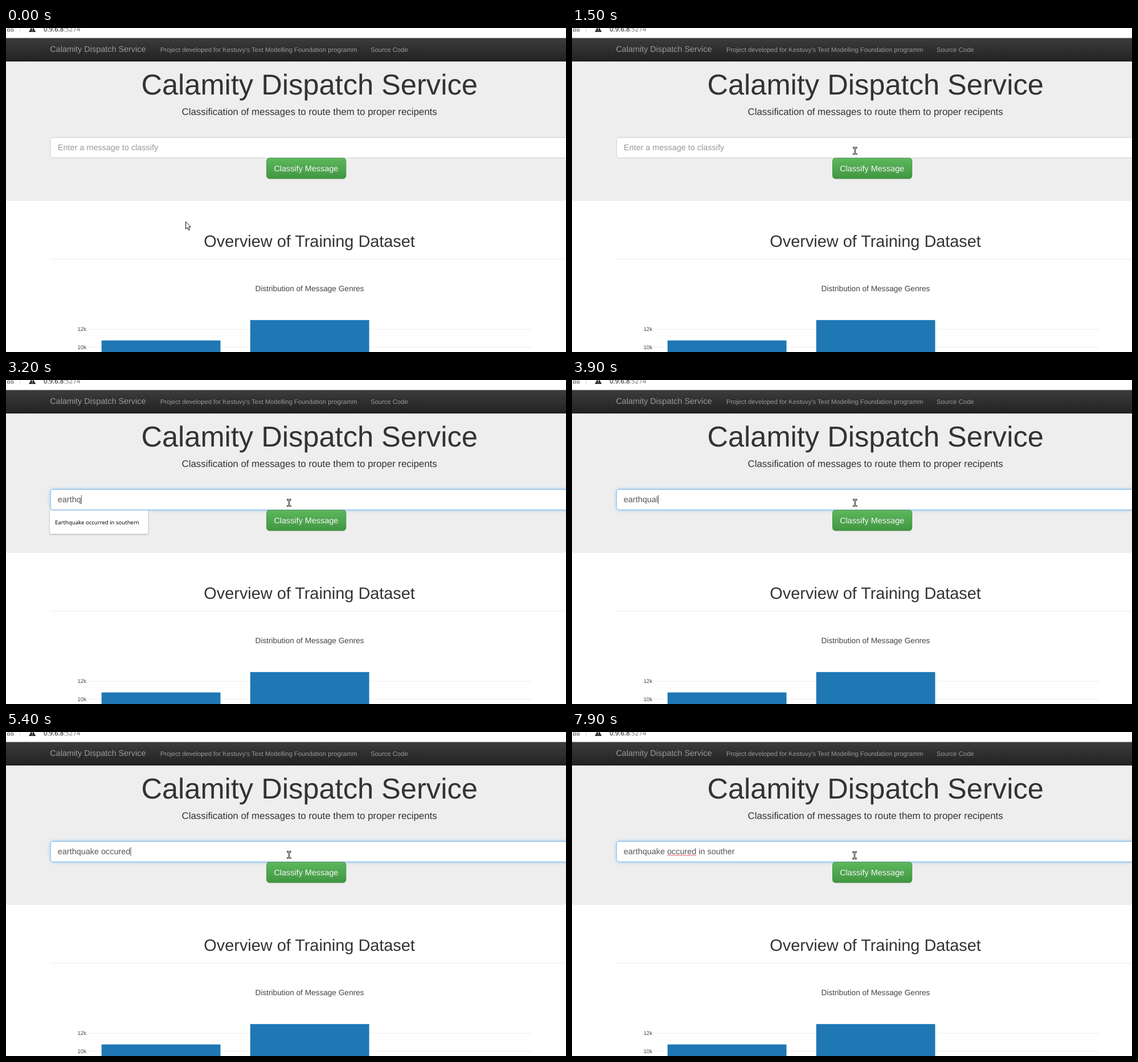
Recreate the animation shown at these times as an HTML page with a canvas. Size 983x570 px, loop 8 s.

```html
<!DOCTYPE html>
<html lang="en">
<head>
<meta charset="utf-8">
<title>Message classifier</title>
<style>
  html, body { margin: 0; width: 100%; height: 100%; overflow: hidden; background: #fff; }
  canvas { display: block; }
</style>
</head>
<body>
<canvas id="stage" width="983" height="570"></canvas>
<script>
const ctx = document.getElementById('stage').getContext('2d');
const W = 983, H = 570, LOOP = 8000, MID = 532.6;
const SANS = '"Liberation Sans", Arial, sans-serif';
const UI = '"Noto Sans", "Open Sans", sans-serif';
const TITLE = 'Calamity Dispatch Service';
const NAV = { top: 17.6, bottom: 58.6 };
const FIELD = { x: 78.2, y: 192.4, w: 930, h: 36.1, textX: 90.8, base: 215.2, size: 14.43 };

// [time, text in the field]
const TYPING = [
  [0, ''], [2300, 'ea'], [3200, 'earthq'], [3300, 'earthqu'], [3400, 'earthqua'],
  [3600, 'earthqual'], [3700, 'earthquale'], [3900, 'earthqual'], [4100, 'earthqua'],
  [4300, 'earthquak'], [4400, 'earthquake'], [4500, 'earthquake o'], [4600, 'earthquake oc'],
  [4800, 'earthquake occ'], [4900, 'earthquake occu'], [5100, 'earthquake occur'],
  [5200, 'earthquake occure'], [5400, 'earthquake occured'], [5500, 'earthquake occured i'],
  [5900, 'earthquake occured in s'], [6000, 'earthquake occured in so'],
  [6200, 'earthquake occured in sou'], [6300, 'earthquake occured in sout'],
  [6500, 'earthquake occured in soute'], [6700, 'earthquake occured in sout'],
  [7000, 'earthquake occured in south'], [7100, 'earthquake occured in souther'],
  [7300, 'earthquake occured in souther '], [7400, 'earthquake occured in souther n'],
  [7600, 'earthquake occured in souther '], [7800, 'earthquake occured in souther']
];

const clamp = v => Math.max(0, Math.min(1, v));
const mix = (a, b, k) => a + (b - a) * k;
const within = (t, a, b) => t >= a && t < b;

function rect(x, y, w, h, color) {
  ctx.fillStyle = color;
  ctx.fillRect(x, y, w, h);
}

function text(str, x, y, size, color, align = 'left', family = SANS) {
  ctx.font = `${size}px ${family}`;
  ctx.textAlign = align;
  ctx.fillStyle = color;
  ctx.fillText(str, x, y);
}

function embossed(str, x, y, size, color, alpha, align) {
  text(str, x, y - 0.8, size, `rgba(0,0,0,${alpha})`, align);
  text(str, x, y, size, color, align);
}

function box(x, y, w, h, r, fill, stroke) {
  ctx.beginPath();
  ctx.roundRect(x, y, w, h, r);
  ctx.fillStyle = fill;
  ctx.fill();
  if (!stroke) return;
  ctx.strokeStyle = stroke;
  ctx.lineWidth = 0.9;
  ctx.stroke();
}

function shadowed(color, blur, dy, draw) {
  ctx.save();
  ctx.shadowColor = color;
  ctx.shadowBlur = blur;
  ctx.shadowOffsetY = dy;
  draw();
  ctx.restore();
}

function gradient(y0, y1, top, bottom) {
  const g = ctx.createLinearGradient(0, y0, 0, y1);
  g.addColorStop(0, top);
  g.addColorStop(1, bottom);
  return g;
}

function polygon(points, fill, stroke) {
  ctx.beginPath();
  points.forEach(([x, y]) => ctx.lineTo(x, y));
  ctx.closePath();
  ctx.fillStyle = fill;
  ctx.fill();
  if (!stroke) return;
  ctx.strokeStyle = stroke;
  ctx.lineWidth = 1;
  ctx.stroke();
}

function addressBar() {
  ctx.strokeStyle = '#5b5b60';
  ctx.lineWidth = 1;
  for (const x of [2.5, 8.9]) {
    ctx.strokeRect(x, 1.8, 3.8, 3.8);
    ctx.strokeRect(x, -4.3, 3.8, 3.8);
  }
  rect(24.6, 0, 0.9, 7.5, '#cfcfd4');
  polygon([[46, -4], [52.3, 7], [40, 7]], '#2b2a33');
  rect(45.5, 0, 1.3, 2.8, '#fff');
  rect(45.5, 4, 1.3, 1.3, '#fff');
  const host = '0.9.6.8';
  text(host, 66, 6.2, 11.4, '#15141a', 'left', UI);
  text(':5274', 66 + ctx.measureText(host).width, 6.2, 11.4, '#77777d', 'left', UI);
}

function navbar() {
  const { top, bottom } = NAV;
  rect(0, top, W, bottom - top, gradient(top, bottom, '#3c3c3c', '#222'));
  rect(0, bottom - 0.8, W, 0.8, '#080808');
  embossed(TITLE, 77.2, 42.4, 14.43, '#9d9d9d', 0.25);
  const links = [
    ["Project developed for Kestuvy's Text Modelling Foundation programm", 271],
    ['Source Code', 640]
  ];
  links.forEach(([label, x]) => embossed(label, x, 41.5, 11.24, '#9d9d9d', 0.25));
}

function header() {
  rect(0, 58, W, 246, '#eee');
  text(TITLE, MID, 117, 50.6, '#333', 'center');
  text('Classification of messages to route them to proper recipents',
    MID, 152.5, 16.84, '#333', 'center');
}

function chart() {
  text('Overview of Training Dataset', MID, 385.1, 28.86, '#333', 'center');
  rect(78, 406, W, 0.9, '#e9e9e9');
  text('Distribution of Message Genres', 533, 463, 13.64, '#444', 'center');
  [['12k', 530], ['10k', 561.4]].forEach(([label, y]) => {
    rect(142, y - 0.4, 783, 0.9, '#eaeaea');
    text(label, 141, y + 3.2, 9.64, '#444', 'right');
  });
  rect(167.7, 549.7, 208.8, 30, '#1f77b4');
  rect(428.7, 513.8, 208.8, 60, '#1f77b4');
}

function squiggle(x0, x1, y) {
  ctx.beginPath();
  for (let x = x0; x <= x1; x += 0.5) ctx.lineTo(x, y + 0.8 * Math.sin((x - x0) * 1.9));
  ctx.strokeStyle = '#e8202a';
  ctx.lineWidth = 0.9;
  ctx.stroke();
}

function field(t) {
  const f = FIELD;
  const focus = t < 2100 ? 0 : clamp((t - 2080) / 150);
  const rgb = [[204, 102], [204, 175], [204, 233]].map(([a, b]) => Math.round(mix(a, b, focus)));
  const border = `rgb(${rgb})`;
  if (focus) {
    shadowed(`rgba(102,175,233,${0.6 * focus})`, 6.4, 0,
      () => box(f.x - 0.4, f.y - 0.4, f.w, f.h + 0.8, 5, '#fff'));
  }
  box(f.x, f.y, f.w, f.h, 4.8, '#fff', border);
  rect(f.x + 4, f.y + 0.5, f.w, 0.9, 'rgba(0,0,0,.06)');

  const typed = TYPING.filter(([at]) => t >= at).pop()[1];
  if (typed) text(typed, f.textX, f.base, f.size, '#555');
  else text('Enter a message to classify', f.textX, f.base, f.size, '#999');

  const endOf = s => f.textX + ctx.measureText(s).width;
  if (t >= 5500) squiggle(endOf('earthquake '), endOf('earthquake occured'), 217);
  if (within(t, 2100, 7900)) rect(endOf(typed) + 0.2, 202.3, 0.9, 15.8, '#444');
}

function button() {
  shadowed('rgba(0,0,0,.075)', 0.8, 0.6,
    () => box(457.5, 228.9, 139.2, 36, 4.8, gradient(229, 265, '#5cb85c', '#419641'), '#3e8f3e'));
  rect(461, 229.5, 132, 0.8, 'rgba(255,255,255,.15)');
  embossed('Classify Message', 526.7, 252, 14.43, '#fff', 0.2, 'center');
}

function suggestion(t) {
  if (!within(t, 2100, 3600) && !within(t, 4100, 5400)) return;
  shadowed('rgba(0,0,0,.35)', 2.6, 0.7,
    () => box(77, 229.2, 172.4, 41.6, 2.5, '#fff'));
  text('Earthquake occurred in southern', 86, 253.8, 9.54, '#0c0c0d', 'left', UI);
}

function arrow(x, y) {
  const shape = [[0, 0], [0, 12.8], [2.9, 10.2], [5, 15], [7.1, 14.1], [5.1, 9.4], [8.8, 9.2]];
  polygon(shape.map(([dx, dy]) => [x + dx, y + dy]), '#fff', '#111');
}

function beam(x, y) {
  ctx.lineCap = 'square';
  [['#111', 2.6], ['#fff', 0.9]].forEach(([color, width]) => {
    ctx.beginPath();
    for (const dy of [-5.6, 5.6]) {
      ctx.moveTo(x - 2.4, y + dy);
      ctx.lineTo(x + 2.4, y + dy);
    }
    ctx.moveTo(x, y - 5.6);
    ctx.lineTo(x, y + 5.6);
    ctx.strokeStyle = color;
    ctx.lineWidth = width;
    ctx.stroke();
  });
  ctx.lineCap = 'butt';
}

function pointer(t) {
  if (t < 100) return arrow(315.5, 340.8);
  if (t < 300) return arrow(336.5, 235.3);
  if (t < 600) return arrow(336.5, 229.3);
  if (t < 1500) {
    const k = clamp((t - 500) / 800);
    const e = k * k * (3 - 2 * k);
    return beam(mix(342, 496.8, e), mix(226, 217, e));
  }
  if (t < 6200) return beam(496.8, 216.2);
  beam(496, 217);
}

function draw(t) {
  rect(0, 0, W, H, '#fff');
  addressBar();
  header();
  navbar();
  chart();
  field(t);
  button();
  suggestion(t);
  pointer(t);
}

ctx.textRendering = 'geometricPrecision';
const start = performance.now();
function tick() {
  const t = (performance.now() - start) % LOOP;
  draw(Math.floor(t / 100) * 100);
  requestAnimationFrame(tick);
}
tick();
</script>
</body>
</html>
```
